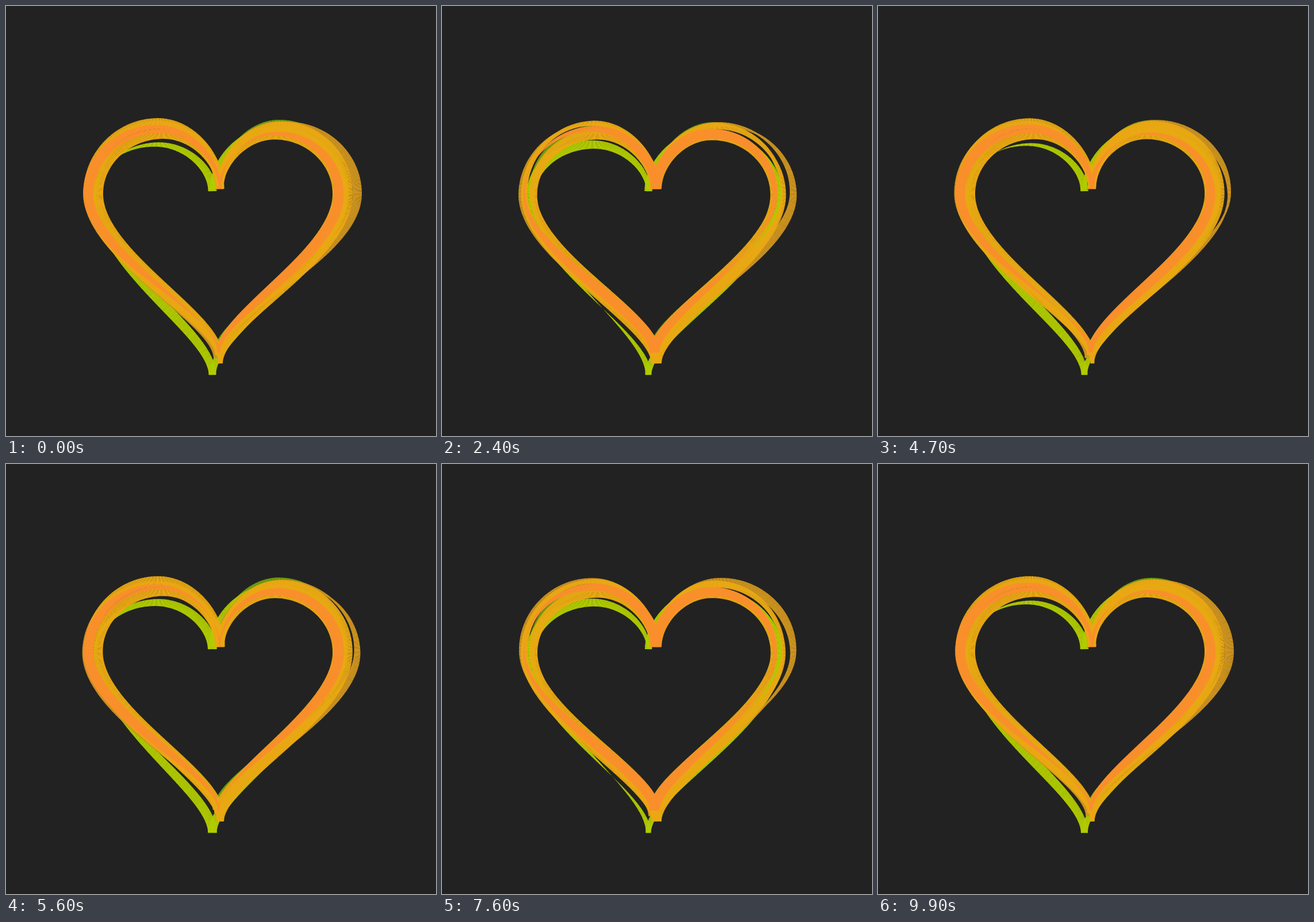
Animation, 748 px wide and 748 px high, one loop 10000 ms. Source, as an HTML page with a canvas:

```html
<!DOCTYPE html>
<html lang="en">
<head>
<meta charset="utf-8">
<title>Ribbon heart</title>
<style>
  html, body { margin: 0; width: 100%; height: 100%; overflow: hidden; background: #222; }
  canvas { display: block; width: 748px; height: 748px; }
</style>
</head>
<body>
<canvas id="stage" width="748" height="748"></canvas>
<script>
const ctx = document.getElementById('stage').getContext('2d');
const SIZE = 748, LOOP = 10, STEPS = 100, PITCH = 2.3;
const CLEFT = { x: 372, y: 318 };

// left and right give the widest x and the top y of each lobe.
// Ribbon width runs from width * thin to width; swells is how many swells pass
// a point per loop, wraps how many fit round the heart (negative runs backwards).
const hearts = [
  { color: '#74a20c', width: 15, thin: 0, swells: 2, wraps: 2.1, lag: 0.75,
    left: { x: 156, y: 215 }, right: { x: 590, y: 205 }, tip: { x: 366, y: 602 } },
  { color: '#b1cc00', width: 16, thin: 0, swells: 2, wraps: 2.18, lag: 0.62, cleft: { x: 359, y: 322 },
    left: { x: 154, y: 241 }, right: { x: 588, y: 217 }, tip: { x: 359, y: 641 } },
  { color: '#cf951f', width: 16, thin: 0.2, swells: 3, wraps: 2.83, lag: 0.34,
    left: { x: 140, y: 206 }, right: { x: 611, y: 206 }, tip: { x: 367, y: 612 } },
  { color: '#eaa813', width: 18, thin: 0.35, swells: 2, wraps: -1.56, lag: 0.73,
    left: { x: 143, y: 204 }, right: { x: 594, y: 209 }, tip: { x: 373, y: 621 } },
  { color: '#eaa813', width: 20, thin: 0.6, swells: 2, wraps: 2.1, lag: 0.94,
    left: { x: 159, y: 223 }, right: { x: 578, y: 224 }, tip: { x: 370, y: 606 } },
  { color: '#fa8e2d', width: 18, thin: 0, swells: 2, wraps: 2.06, lag: 0.05,
    left: { x: 143, y: 214 }, right: { x: 579, y: 222 }, tip: { x: 370, y: 602 } }
];

const mix = (a, b, k) => a + (b - a) * k;

function halfPath(cleft, lobe, tip) {
  const topX = mix(lobe.x, cleft.x, 0.53);
  const sideY = cleft.y + 9;
  return `C ${cleft.x} ${mix(cleft.y, lobe.y, 0.47)} ${mix(topX, cleft.x, 0.55)} ${lobe.y} ${topX} ${lobe.y}
    C ${mix(topX, lobe.x, 0.55)} ${lobe.y} ${lobe.x} ${mix(sideY, lobe.y, 0.55)} ${lobe.x} ${sideY}
    C ${lobe.x} ${mix(sideY, tip.y, 0.38)} ${tip.x} ${mix(tip.y, sideY, 0.24)} ${tip.x} ${tip.y}`;
}

// Evenly spaced points on one half; u is the share of the whole heart travelled.
function trace(cleft, lobe, tip, toU) {
  const path = document.createElementNS('http://www.w3.org/2000/svg', 'path');
  path.setAttribute('d', `M ${cleft.x} ${cleft.y} ${halfPath(cleft, lobe, tip)}`);
  const total = path.getTotalLength(), points = [];
  for (let s = PITCH / 2; s < total; s += PITCH) {
    const a = path.getPointAtLength(s - 0.5), b = path.getPointAtLength(s + 0.5);
    const len = Math.hypot(b.x - a.x, b.y - a.y);
    points.push({
      x: (a.x + b.x) / 2, y: (a.y + b.y) / 2,
      nx: (a.y - b.y) / len, ny: (b.x - a.x) / len,
      u: toU(s / total)
    });
  }
  return points;
}

for (const heart of hearts) {
  const { cleft = CLEFT, left, right, tip } = heart;
  heart.points = [
    ...trace(cleft, left, tip, k => k / 2),
    ...trace(cleft, right, tip, k => 1 - k / 2)
  ];
}

function drawHeart({ color, width, thin, swells, wraps, lag, points }, time) {
  ctx.strokeStyle = color;
  ctx.lineWidth = PITCH + 0.1;
  for (const { x, y, nx, ny, u } of points) {
    const swell = Math.abs(Math.sin(Math.PI * (swells * time - lag - wraps * u)));
    const r = width / 2 * mix(thin, 1, swell);
    ctx.beginPath();
    ctx.moveTo(x - nx * r, y - ny * r);
    ctx.lineTo(x + nx * r, y + ny * r);
    ctx.stroke();
  }
}

let shown = -1;
function draw(ms) {
  const step = Math.floor(ms / 1000 / LOOP * STEPS) % STEPS;
  if (step === shown) return;
  shown = step;
  ctx.fillStyle = '#222';
  ctx.fillRect(0, 0, SIZE, SIZE);
  for (const heart of hearts) drawHeart(heart, step / STEPS);
}

const begin = performance.now();
function tick() {
  draw(performance.now() - begin);
  requestAnimationFrame(tick);
}
tick();
</script>
</body>
</html>
```
